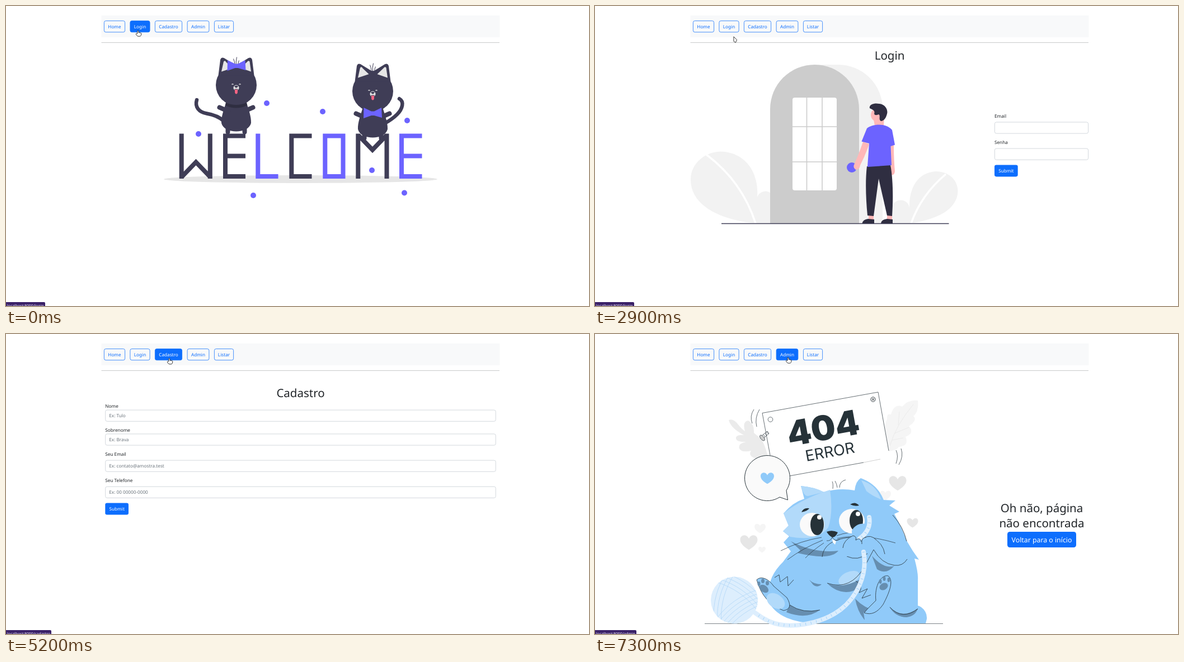
An HTML page for the animation above (8000 ms loop, 1042x537 px).

```html
<!DOCTYPE html>
<html lang="pt">
<head>
<meta charset="utf-8">
<style>
html, body { margin: 0; width: 100%; height: 100%; overflow: hidden; background: #fff; }
svg { display: block; width: 1042px; height: 537px; }
text { font-family: "Noto Sans", "Open Sans", sans-serif; font-size: 8.2px; fill: #212529; text-rendering: geometricPrecision; }
.mid { text-anchor: middle; }
.h1 { font-size: 20.5px; }
.hint { fill: #6c757d; }
.white { fill: #fff; }
.sign { font-family: Inter, sans-serif; fill: #263238; }
</style>
</head>
<body>
<svg viewBox="0 0 1042 537" xmlns="http://www.w3.org/2000/svg">
  <defs>
    <g id="kitten">
      <path d="M-18 30C-22 44 -27 56 -26.500 68C-22 88 22 88 26.500 68C27 56 22 44 18 30Z"/>
      <path d="M-30 40L-14 47M30 40L14 47M-15 78V84M15 78V84" stroke="#3f3d56" stroke-width="8" stroke-linecap="round"/>
      <circle r="36.500"/>
      <path d="M-32 -17L-28.500 -45Q-27 -50.500 -22 -48.500L0 -35L22 -48.500Q27 -50.500 28.500 -45L32 -17Z"/>
      <path d="M-2 -34Q-3 -43 -5 -47M0 -34Q-1 -43 1 -50M3 -34Q3 -40 5 -44" fill="none" stroke="#3f3d56" stroke-width="1"/>
      <path d="M-26.500 -24L-22.500 -42Q-20 -45 -18 -41L-7 -30.500ZM26.500 -24L24 -42Q22 -45 19 -41L8 -30.500Z" fill="#e6e6e6"/>
      <path d="M-8 -1Q-6.500 -2.800 -5 -1M5 -1Q6.500 -2.800 8 -1" fill="none" stroke="#e6e6e6" stroke-width="1.200"/>
      <ellipse cy="5" rx="5" ry="5" fill="#e6e6e6"/>
      <path d="M-3.500 2Q0 0 3.500 2Q2 5 0 5Q-2 5 -3.500 2ZM-3 7H3V9H-3Z"/>
      <path d="M-2.400 8H2.400V13Q2 16 0 16Q-2 16 -2.400 13Z" fill="#ff6584"/>
    </g>
    <path id="bow" d="M-16 -10L-2.500 -3.500H2.500L15.500 -10L16.500 8L2.500 4H-2.500L-16.500 9Z" fill="#6c63ff"/>
    <clipPath id="ball"><circle cx="249" cy="476.500" r="42"/></clipPath>
  </defs>

  <g id="nav">
    <rect x="170.500" y="17" width="712" height="39" fill="#f8f9fa"/>
    <path d="M170.500 65.500H882" stroke="#c9cacb"/>
    <g id="buttons"></g>
  </g>

  <g id="home">
    <ellipse cx="526.500" cy="310" rx="244.500" ry="7" fill="#e6e6e6"/>
    <g fill="none" stroke="#3f3d56" stroke-width="8">
      <path d="M313.700 228.400V309M364.800 228.400V309M314 306L339.500 279.500L365 306"/>
      <path d="M428 232.400H392V305H428M392 268.400H428M546.500 232.400H510.300V305H546.500"/>
      <path d="M629.300 309V228.400M680.500 309V228.400M629.500 231L655 257.500L680.500 231"/>
      <path d="M450.300 228.400V305H486.500M570.300 232.400H602.500V305H570.300ZM743.500 232.400H707V305H743.500M707 268.400H743.500" stroke="#6c63ff"/>
      <g stroke-width="6.500" stroke-linecap="round">
        <path d="M341 168C337 181 345 190 359 192.500C374 195 382 199 389 206"/>
        <path d="M703 166C712 171 709 184 699 194C693 200 686 205 677 210"/>
      </g>
    </g>
    <g fill="#3f3d56">
      <use href="#kitten" x="411.500" y="141.500"/>
      <use href="#kitten" x="655.500" y="152.500"/>
    </g>
    <path d="M393 173Q411 181 430 173L431 178Q411 187 392 178Z" fill="#2f2e41"/>
    <use href="#bow" x="412" y="107"/>
    <use href="#bow" x="655.500" y="192"/>
    <g id="dots" fill="#6c63ff"></g>
  </g>

  <g id="login">
    <text class="mid h1" x="526.500" y="96">Login</text>
    <g fill="#f2f2f2">
      <path d="M392 105H434.500A79.500 79.500 0 0 1 514 184V389H392Z"/>
      <path d="M288 389C230 384 171 360 171 311C171 280 199 260.500 225 260.500C272 262 295 303 289.500 347A15 15 0 0 1 314 335V389Z"/>
      <path d="M563 389C607 383 648 366 648.500 331C648 310 631 296 609 296C577 298 561 325 562 362A15.500 15.500 0 0 0 531 364V389Z"/>
    </g>
    <path d="M199 266Q263 314 287 389M627 301Q583 338 565 389" fill="none" stroke="#fff" stroke-width="3.500"/>
    <path d="M313 389V184.500A79.500 79.500 0 0 1 472 184.500V389Z" fill="#ccc"/>
    <rect x="353" y="164" width="79" height="166" rx="4" fill="#fff"/>
    <path d="M378.500 164V330M406 164V330M353 216H432M353 279H432" stroke="#ccc" stroke-width="1.600"/>
    <circle cx="459" cy="289" r="9" fill="#6c63ff"/>
    <g fill="#ffb8b8">
      <path d="M479 243L490 247Q483 268 474 285Q473 293 466 293Q460 289 464 282Q472 264 479 243Z"/>
      <path d="M528 248L534 249Q534 275 536 296Q535 304 529 302Q526 298 529 290Z"/>
      <circle cx="505" cy="195" r="12"/>
      <path d="M497 198H517L516 214H500ZM489 372H498V386H489ZM522 372H531V386H522Z"/>
    </g>
    <g fill="#2f2e41">
      <path d="M491 183C489 176 500 173 508 175C519 176 524 186 522 193C520 201 516 206 511 206C506 203 511 196 507 194Q500 197 499 193C501 186 496 186 491 183Z"/>
      <path d="M486 287L528 284C533 311 533 347 531 376L522 375L507 309L498 376L487 375C484 345 483 312 486 287ZM477.500 389Q479 382 488 381L499 382V389ZM511 389Q512 382 522 381L532 382V389Z"/>
    </g>
    <path d="M486 219C496 211 520 209 531 222L536 248.500L528.500 251L530 285L487 288L490 246L476.500 242.500Z" fill="#6c63ff"/>
    <path d="M226 389.500H632.500" stroke="#3f3d56" stroke-width="1.500"/>
    <g id="loginForm"></g>
  </g>

  <g id="signup">
    <text class="mid h1" x="526.500" y="113">Cadastro</text>
    <g id="signupForm"></g>
  </g>

  <g id="missing">
    <path d="M239 154Q247 151 255 161Q263 171 268 174Q263 156 274 155Q285 161 284 177Q292 183 299 191Q306 205 309 220L298 228Q288 224 283 221Q274 217 279 209Q262 213 258 205Q255 196 270 193Q251 194 252 185Q254 180 266 181Q242 168 239 154Z" fill="#ebebeb"/>
    <path d="M525 210L518 174Q517 160 522 153Q521 141 529 144Q535 124 549 130Q560 117 577 119Q579 139 569 147Q577 154 561 165Q572 177 555 184Q562 200 543 202Q540 208 525 210Z" fill="#f5f5f5"/>
    <path d="M527 200Q538 163 569 126M535 178L561 167M542 163L544 139M531 190L551 186" fill="none" stroke="#e8e8e8" stroke-width=".8"/>
    <g fill="none" stroke="#263238" stroke-width=".7">
      <path d="M348 254L299 141.500L506 104L525 207L510 224Z" fill="#fff" stroke="none"/>
      <path d="M313 217L299 141.500L506 104L525 209M348 254L480 230"/>
      <path d="M480 230L510 224" stroke="#bbb"/>
      <path d="M284 135Q276 147 281 160M294 135Q285 150 289 166M538 208Q543 218 538 232M547 205Q552 219 543 234"/>
      <circle cx="313.500" cy="153" r="4.300"/><circle cx="497" cy="117" r="4.300" fill="#ddd"/>
      <path d="M495 115L499 119M499 115L495 119"/>
      <path d="M298 182L308 174L311 178L302 186ZM301 180L304 184M304 178L307 182M307 175L310 179"/>
      <ellipse cx="299" cy="186" rx="3" ry="6" transform="rotate(-40 299 186)" fill="#ccc"/>
      <path d="M344.500 297L342 280A40.500 40.500 0 1 0 330 292Z" fill="#fafafa" stroke-width="1"/>
    </g>
    <g class="mid" transform="rotate(-10.300 409 170)">
      <text class="sign" x="408" y="190" style="font-size:61.500px;font-weight:900">404</text>
      <text class="sign" x="412.500" y="221.500" style="font-size:27px;font-weight:400">ERROR</text>
    </g>
    <g id="hearts"></g>
    <path d="M196 518.500H622" stroke="#263238" stroke-width=".6"/>
    <circle cx="249" cy="476.500" r="42" fill="#ddeefd"/>
    <g id="yarn" clip-path="url(#ball)" fill="none" stroke="#b5d9f8" stroke-width=".8"></g>
    <path d="M560 518V488Q572 482 583 489Q594 497 593 510L591 518Z" fill="#90caf9"/>
    <path d="M337 321Q354 301 374 295L368 272Q392 274 409 283Q437 275 464 280Q466 263 475 258Q505 269 516 297L537 298L526 307L544 318L535 322Q549 348 557 370Q567 388 579 404L571 402Q578 428 577 440V486Q576 505 568 518H390Q330 514 312 482Q303 440 336 408L350 389L337 373L347 362L336 353L346 343Z" fill="#90caf9"/>
    <path d="M337 321Q371 294 420 279Q426 319 417 346Q399 372 349 363L336 353L346 343ZM368 272Q373 291 381 290L409 283Q392 274 368 272ZM476 262Q503 270 511 296Q494 289 485 281Z" fill="#b2dafa"/>
    <ellipse cx="454" cy="437" rx="20" ry="11" transform="rotate(-25 454 437)" fill="#b2dafa"/>
    <g fill="#668eb0">
      <path d="M350 371Q391 393 435 388Q421 406 362 392L367 387Z"/>
      <path d="M415 446Q441 458 478 437Q475 461 449 462Q429 461 415 446ZM495 397Q517 422 535 415Q520 432 504 421ZM383 440Q391 448 405 448Q397 455 390 449Z"/>
      <path d="M465 474Q482 491 501 495Q489 502 480 498L482 512Q469 497 465 474ZM526 488Q549 512 577 491Q573 505 557 507Q537 507 526 488ZM348 485Q369 500 402 494Q378 512 342 498Z"/>
    </g>
    <g fill="none" stroke="#263238" stroke-width=".8" stroke-linejoin="round">
      <path d="M289 440C297 432 311 439 319 451L343 472Q355 492 337 495Q300 481 289 440Z" fill="#90caf9"/>
      <path d="M502 477C499 450 512 430 524 433C535 442 525 465 515 484Q500 506 481 499L489 490Z" fill="#90caf9"/>
      <path d="M321 436L329 431L331 444L344 434L345 451L355 440M466 442Q481 451 472 463L487 456L477 473L493 467"/>
      <path d="M406 399Q409 369 455 364M415 446Q457 460 482 416L498 386Q512 411 535 414Q550 416 558 403M518 394Q515 374 495 364M532 324Q551 345 557 371M527 489Q549 513 577 492M348 485Q372 501 402 494M450 398Q470 407 487 393"/>
      <path d="M405 364Q368 370 332 388M407 369Q372 383 344 404M409 374Q388 388 376 401M432 361Q454 353 475 355M433 366Q476 356 537 374" stroke-width=".7"/>
    </g>
    <g fill="#668eb0">
      <ellipse cx="302" cy="456" rx="9" ry="6" transform="rotate(35 302 456)"/>
      <ellipse cx="293" cy="447" rx="2.500" ry="4"/><ellipse cx="300" cy="442" rx="3" ry="4"/><ellipse cx="308" cy="446" rx="3" ry="4"/>
      <ellipse cx="516" cy="452" rx="8" ry="6" transform="rotate(-30 516 452)"/>
      <ellipse cx="510" cy="443" rx="2.500" ry="4"/><ellipse cx="517" cy="438" rx="2.500" ry="4"/><ellipse cx="525" cy="440" rx="2.500" ry="4"/>
    </g>
    <ellipse cx="323" cy="478" rx="18" ry="12" transform="rotate(35 323 478)" fill="#b2dafa"/>
    <g fill="#fafafa">
      <ellipse cx="388" cy="341" rx="22" ry="21"/><ellipse cx="459" cy="335" rx="23" ry="22"/>
      <path d="M424 367L431 371L429 377L425 373Z"/>
    </g>
    <g fill="#263238">
      <ellipse cx="397" cy="341" rx="12" ry="19"/><ellipse cx="467" cy="334" rx="12" ry="19"/>
      <path d="M369 319Q373 310 383 312Q380 317 369 319ZM456 305Q465 299 472 307Q464 309 456 305ZM414 354Q424 350 434 355Q430 364 424 364Q418 361 414 354Z"/>
    </g>
    <circle cx="401" cy="328" r="4" fill="#fff"/><circle cx="470" cy="322" r="4" fill="#fff"/>
    <path d="M424 364Q421 371 414 370M424 364Q430 373 438 367M425 277Q426 268 424 264M433 275Q432 268 429 263M437 275Q437 264 448 261" fill="none" stroke="#263238" stroke-width=".7"/>
    <path d="M459 352Q467 337 485 340Q490 350 478 358L473 371Q459 374 459 352Z" fill="#90caf9"/>
    <g id="strand" fill="none"></g>
    <path d="M443 383Q444 369 461 361Q468 362 466 369Q474 363 476 372Q468 393 448 399ZM481 365Q493 358 503 369Q513 382 497 386Q483 389 477 376Z" fill="#90caf9"/>
    <path d="M443 383Q444 369 461 361Q468 362 466 369Q474 363 476 372M477 376Q476 366 481 365Q493 358 503 369" fill="none" stroke="#263238" stroke-width=".8"/>
    <text class="mid h1" x="798.500" y="319">Oh não, página</text>
    <text class="mid h1" x="798.500" y="345.500">não encontrada</text>
    <rect x="737" y="354" width="123" height="28" rx="4.400" fill="#0d6efd"/>
    <text class="mid white" x="798.500" y="373" style="font-size:12.300px">Voltar para o início</text>
  </g>

  <g id="status">
    <path id="statusBox" fill="#3a2168"/>
    <text id="statusText" x="2" y="539" style="font-size:6.900px;fill:#eee8f8"></text>
  </g>
  <g id="cursor" fill="#fff" stroke="#222" stroke-width=".9" stroke-linejoin="round">
    <path id="hand" d="M2.800 1.500Q4 .2 5 1.700V4.500L8.800 5.200Q10 5.500 9.800 7L9.300 9.500Q8.700 11.200 7 11.200H4Q2.200 10.800 .7 8.300Q-.1 6.400 1.300 5.900L3 6.400Z"/>
    <path id="arrow" d="M.4 .4L6 6L3.900 10.800L.5 8.900Z"/>
  </g>
</svg>
<script>
const LOOP = 8000, BLUE = [13, 110, 253], BAR = [248, 249, 250];
const el = id => document.getElementById(id);
const mix = (a, b, k) => `rgb(${a.map((v, i) => Math.round(v + (b[i] - v) * k))})`;
const at = (steps, t) => steps.reduce((last, s) => s[0] <= t ? s : last);

// Navigation
const tabs = [['Home', 175, 38], ['Login', 221.5, 36], ['Cadastro', 266, 49], ['Admin', 323.7, 39.6], ['Listar', 372, 35]];
el('buttons').innerHTML = tabs.map(([label, x, w]) => `<g>
  <rect x="${x - 1.1}" y="25.4" width="${w + 2.2}" height="23.2" rx="4.4" fill="none" stroke="#86b6fe" stroke-width="2.2"/>
  <rect x="${x + .4}" y="26.6" width="${w - .8}" height="20.2" rx="3" stroke="#0d6efd" stroke-width=".75"/>
  <text class="mid" x="${x + w / 2}" y="40">${label}</text></g>`).join('');
const navButtons = [...el('buttons').children];

// Forms
const field = (label, x, y, w, gap, hint = '') => `<text x="${x}" y="${y}">${label}</text>
  <rect x="${x + .4}" y="${y + gap + .4}" width="${w - .8}" height="20.2" rx="3" fill="#fff" stroke="#ced4da" stroke-width=".9"/>
  <text class="hint" x="${x + 7}" y="${y + gap + 13.5}">${hint}</text>`;
const submit = (x, y) => `<rect x="${x}" y="${y}" width="41.7" height="21" rx="3.3" fill="#0d6efd"/>
  <text class="mid white" x="${x + 20.9}" y="${y + 13.5}">Submit</text>`;
el('loginForm').innerHTML = field('Email', 714, 200, 168, 7.5) + field('Senha', 714, 247, 168, 7.7) + submit(714, 284.4);
el('signupForm').innerHTML = field('Nome', 177.3, 132, 698.4, 3.7, 'Ex: Tulo')
  + field('Sobrenome', 177.3, 175, 698.4, 3.5, 'Ex: Brava')
  + field('Seu Email', 177.3, 218, 698.4, 7.7, 'Ex: contato@amostra.test')
  + field('Seu Telefone', 177.3, 265, 698.4, 7.8, 'Ex: 00 00000-0000') + submit(177.3, 302.5);

// Small illustration parts
const dots = [[344, 229], [466, 174], [566, 189], [717, 205], [654, 294], [442, 339], [712, 334.5]];
el('dots').innerHTML = dots.map(([x, y]) => `<circle cx="${x}" cy="${y}" r="5"/>`).join('');
const hearts = [[308, 258, 24, '#90caf9'], [541, 267, 31, '#e6e6e6'], [519, 289, 20, '#f5f5f5'], [567.5, 338, 20, '#e6e6e6'],
  [275, 373, 31, '#e6e6e6'], [295, 348, 20, '#f5f5f5'], [298.5, 386, 13, '#f5f5f5']];
el('hearts').innerHTML = hearts.map(([x, y, w, fill]) => `<path transform="translate(${x} ${y}) scale(${w})" fill="${fill}"
  d="M0 .43C-.25 .28 -.5 .08 -.5 -.15C-.5 -.46 -.12 -.5 0 -.22C.12 -.5 .5 -.46 .5 -.15C.5 .08 .25 .28 0 .43Z"/>`).join('');
const threads = (angle, from, count) => `<g transform="rotate(${angle} 249 476.5)">` + Array.from({length: count}, (_, i) =>
  `<path d="M205 ${from + i * 7}q44 -14 88 0"/>`).join('') + '</g>';
el('yarn').innerHTML = threads(35, 447, 4) + threads(-35, 485, 5) + threads(-75, 450, 3);
const strand = 'M490 328Q494 351 473 366M480 390C488 433 466 473 438 494C403 520 345 529 313 515Q299 509 286 499';
el('strand').innerHTML = `<path d="${strand}" stroke="#ddeefd" stroke-width="8" stroke-linecap="round"/>
  <path d="${strand}" stroke="#90caf9" stroke-width="5" stroke-dasharray=".7 9"/>`;

// Timeline: every entry holds until the next one
const pages = [[0, 'home'], [2900, 'login'], [5200, 'signup'], [7000, ''], [7300, 'missing']];
const cursor = [[0, 232, 43, 'hand'], [200, 232.4, 43.4, 'hand'], [900, 231.4, 43.8, 'hand'], [1800, 231.3, 44, 'hand'],
  [1900, 233, 42, 'hand'], [2900, 247.5, 54.5, 'arrow'], [3200, 253, 58, 'arrow'], [3400, 265, 52, 'arrow'],
  [3500, 264.5, 48, 'arrow'], [3700, 279, 47, 'arrow'], [3800, 290, 47, 'arrow'], [4100, 287.5, 44, 'hand'],
  [4500, 288, 43.6, 'hand'], [4700, 288, 42.7, 'hand'], [6000, 287.3, 43.4, 'hand'], [6200, 311.5, 40, 'hand'],
  [6400, 332.5, 44, 'hand'], [6600, 341.2, 41, 'hand']];
const hover = {
  Login: [[0, 1], [2900, 0]],
  Cadastro: [[0, 0], [4100, .5], [4300, 1], [6400, .6], [6600, 0]],
  Admin: [[0, 0], [6600, .95], [6800, 1]]
};
const focus = {
  Login: [[0, 0], [2300, .4], [2400, .8], [2500, 1], [2900, 0]],
  Cadastro: [[0, 0], [5000, 1], [5200, 0]]
};
const links = [[0, 'login', 70, 1], [3200, 'login', 70, .5], [3400, 'login', 70, 0],
  [4100, 'cadastro', 81, .6], [4300, 'cadastro', 81, 1], [6400, 'admin', 74, 1]];
const still = [[0, 0]];

function draw(t) {
  const page = at(pages, t)[1];
  for (const id of ['home', 'login', 'signup', 'missing']) el(id).style.display = id === page ? '' : 'none';
  el('nav').style.display = page ? '' : 'none';
  navButtons.forEach((button, i) => {
    const name = tabs[i][0], k = at(hover[name] || still, t)[1];
    const [ring, box, label] = button.children;
    ring.setAttribute('opacity', at(focus[name] || still, t)[1]);
    box.setAttribute('fill', mix(BAR, BLUE, k));
    label.style.fill = mix(BLUE, [255, 255, 255], k);
  });
  const [, path, width, opacity] = at(links, t);
  el('status').setAttribute('opacity', opacity);
  el('statusBox').setAttribute('d', `M0 530H${width - 2}q2 0 2 2V537H0Z`);
  el('statusText').textContent = 'localhost:8000/' + path;
  const [, x, y, kind] = at(cursor, t);
  el('cursor').setAttribute('transform', `translate(${x} ${y})`);
  for (const id of ['hand', 'arrow']) el(id).style.display = id === kind ? '' : 'none';
}

const start = performance.now();
function tick(now) {
  draw(Math.max(0, now - start) % LOOP);
  requestAnimationFrame(tick);
}
draw(0);
requestAnimationFrame(tick);
</script>
</body>
</html>
```
